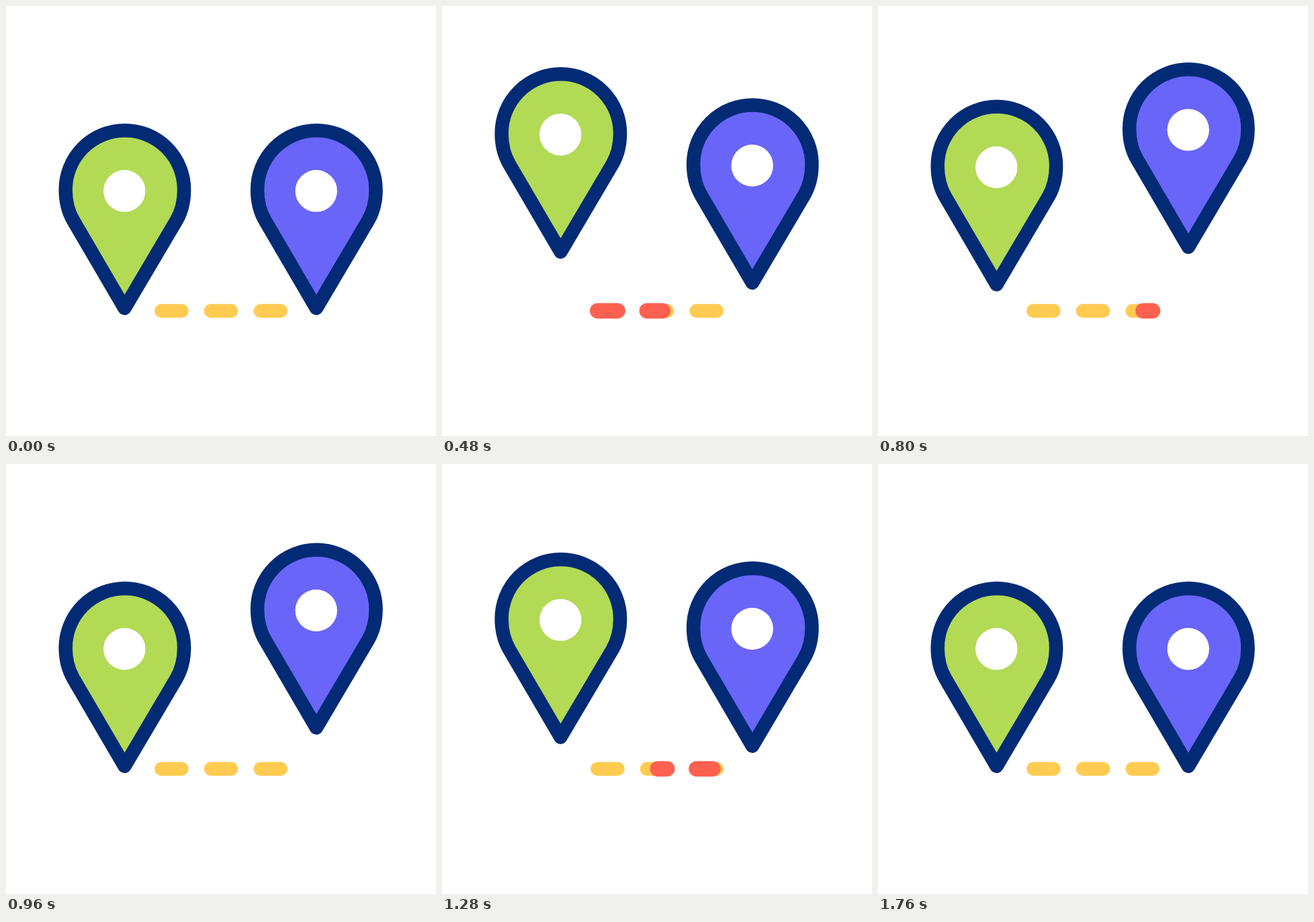
Write an HTML page with a canvas that moves like this. It is 640 px wide and 640 px high and loops after 2 s.

```html
<!DOCTYPE html>
<html lang="en">
<head>
<meta charset="utf-8">
<title>Route pins</title>
<style>
html, body { margin: 0; width: 100%; height: 100%; overflow: hidden; background: #fff; }
canvas { display: block; width: 640px; height: 640px; }
</style>
</head>
<body>
<canvas id="stage" width="640" height="640"></canvas>
<script>
const canvas = document.getElementById('stage');
const ctx = canvas.getContext('2d');
const scale = window.devicePixelRatio || 1;
canvas.width = canvas.height = 640 * scale;

const LOOP = 2000, STEP = 40;
const NAVY = '#032b75', GREEN = '#b2da55', PURPLE = '#6965f8';
const YELLOW = '#ffcb51', RED = '#ff6150';

// Pin height over time: [ms, px]
const HOPS = [[0, 0], [597, 91], [956, 0], [1186, 62], [1432, 0]];
const PIN_LAG = 211;

// Red sweeps along the dashes
const SWEEPS = [
  { start: 223, time: 462, lag: 242 },
  { start: 1066, time: 259, lag: 83 },
  { start: 1417, time: 259, lag: 83 }
];
const DASH = { x: 231.4, y: 453.7, len: 30, gap: 73.65, count: 3 };

// cubic-bezier(.42, 0, .58, 1)
function ease(u) {
  if (u <= 0) return 0;
  if (u >= 1) return 1;
  let lo = 0, hi = 1, s = 0.5;
  for (let i = 0; i < 24; i++) {
    s = (lo + hi) / 2;
    const x = 3 * (1 - s) * s * (0.42 * (1 - s) + 0.58 * s) + s * s * s;
    if (x < u) lo = s; else hi = s;
  }
  return s * s * (3 - 2 * s);
}

function hopHeight(t) {
  for (let i = 1; i < HOPS.length; i++) {
    const [t0, h0] = HOPS[i - 1], [t1, h1] = HOPS[i];
    if (t < t1) return h0 + (h1 - h0) * ease((t - t0) / (t1 - t0));
  }
  return 0;
}

// Half circle on top, short curved shoulders, straight sides to the tip
function pinPath(r) {
  ctx.beginPath();
  ctx.arc(0, 0, r, Math.PI, 0);
  ctx.bezierCurveTo(r, 16, 84.6, 32.5, 76.6, 46.1);
  ctx.lineTo(-0.4, 176.4);
  ctx.lineTo(-76.6, 46.1);
  ctx.bezierCurveTo(-84.6, 32.5, -r, 16, -r, 0);
  ctx.closePath();
}

function drawPin(x, lift, fill) {
  ctx.save();
  ctx.translate(x, 273.4 - lift);
  pinPath(88.2);
  ctx.fillStyle = fill;
  ctx.fill();
  ctx.lineWidth = 20.5;
  ctx.lineJoin = 'round';
  ctx.strokeStyle = NAVY;
  ctx.stroke();
  ctx.beginPath();
  ctx.arc(-0.6, 1.9, 31.2, 0, Math.PI * 2);
  ctx.fillStyle = '#fff';
  ctx.fill();
  ctx.restore();
}

// Strokes the part of each dash lying between tail and head, counted in dashes
function drawDashes(tail, head, color, width) {
  ctx.lineCap = 'round';
  ctx.lineWidth = width;
  ctx.strokeStyle = color;
  for (let i = 0; i < DASH.count; i++) {
    const a = Math.max(tail - i, 0), b = Math.min(head - i, 1);
    if (a >= b) continue;
    const x = DASH.x + i * DASH.gap;
    ctx.beginPath();
    ctx.moveTo(x + a * DASH.len, DASH.y);
    ctx.lineTo(x + b * DASH.len, DASH.y);
    ctx.stroke();
  }
}

function draw(t) {
  ctx.setTransform(scale, 0, 0, scale, 0, 0);
  ctx.fillStyle = '#fff';
  ctx.fillRect(0, 0, 640, 640);
  drawDashes(0, DASH.count, YELLOW, 20.6);
  for (const { start, time, lag } of SWEEPS) {
    const head = DASH.count * ease((t - start) / time);
    const tail = DASH.count * ease((t - start - lag) / time);
    drawDashes(tail, head, RED, 23);
  }
  drawPin(176.9, hopHeight(t), GREEN);
  drawPin(462.3, hopHeight(t - PIN_LAG), PURPLE);
}

const begin = performance.now();
function tick(now) {
  const t = Math.max(0, now - begin) % LOOP;
  draw(Math.floor(t / STEP) * STEP);
  requestAnimationFrame(tick);
}
draw(0);
requestAnimationFrame(tick);
</script>
</body>
</html>
```
